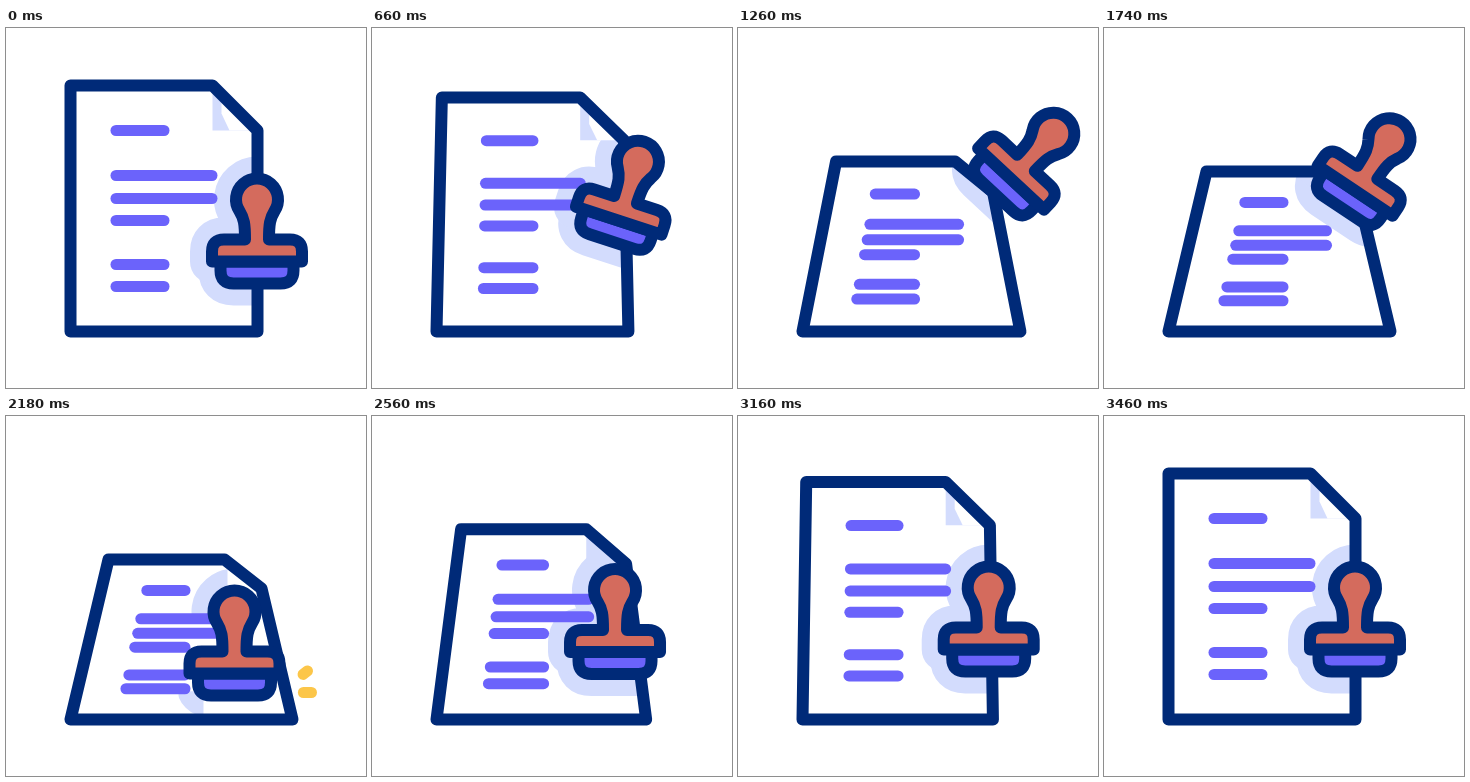
An HTML page with a canvas that plays this animation: 360 by 360 pixels, repeating every 3.48 s.

```html
<!DOCTYPE html>
<html>
<head>
<meta charset="utf-8">
<style>
html, body { margin: 0; width: 100%; height: 100%; overflow: hidden; background: #fff; }
canvas { display: block; }
</style>
</head>
<body>
<canvas id="stage" width="360" height="360"></canvas>
<script>
const ctx = document.getElementById('stage').getContext('2d');
const LOOP = 3480, LIFT = 500, DROP = 1260, HIT = 2060, RETURN = 2190, END = 3460;
const NAVY = '#002a78', RED = '#d46b5d', PURPLE = '#6b63fb', PALE = '#d3dcfd', YELLOW = '#fcc649';

// Stamp parts, with the centre of the handle knob at the origin
const body = new Path2D('M-45 62V52Q-45 40-33 40H-12C-12 24-13 19-17.5 11.6A21 21 0 1 1 17.5 11.6C13 19 12 24 12 40H33Q45 40 45 52V62Z');
const pad = new Path2D('M-36.5 62V71Q-36.5 84-23.5 84H23.5Q36.5 84 36.5 71V62Z');

const mix = (a, b, k) => a + (b - a) * k;
const progress = (t, from, to) => Math.min(1, Math.max(0, (t - from) / (to - from)));

// Ease to rest; push is the starting speed (0 = smoothstep, 3 = cubic ease-out)
function ease(t, from, to, push) {
  const u = progress(t, from, to);
  return u * u * (3 - 2 * u) + push * u * (1 - u) ** 2;
}

const tiltAt = t => ease(t, LIFT, 1500, .63) - ease(t, RETURN, END, 1);

// Lift to the right, slam down to the left, drift back
function stampAt(t) {
  const fall = progress(t, DROP, HIT);
  return {
    x: 250.5 + 64.3 * ease(t, LIFT, 1150, .56) - 86.8 * fall ** 2.1 + 22.5 * ease(t, RETURN, END, 3),
    y: 171 - 65.8 * ease(t, LIFT, 1150, 3) + 89.8 * fall ** 5.5 - 24 * ease(t, RETURN, 2900, 3),
    angle: 43 * (ease(t, LIFT, 1150, 1.9) - fall ** 3)
  };
}

function polygon(...points) {
  const path = new Path2D();
  points.forEach(([x, y]) => path.lineTo(x, y));
  path.closePath();
  return path;
}

function stroke(path, color, width) {
  ctx.strokeStyle = color;
  ctx.lineWidth = width;
  ctx.stroke(path);
}

function fill(path, color) {
  ctx.fillStyle = color;
  ctx.fill(path);
}

function bar(x0, y0, x1, y1, color) {
  const path = new Path2D();
  path.moveTo(x0, y0);
  path.lineTo(x1, y1);
  stroke(path, color, 11);
}

function drawStamp(t, padColor, bodyColor, edge, width) {
  const { x, y, angle } = stampAt(t);
  ctx.save();
  ctx.translate(x, y);
  ctx.rotate(angle * Math.PI / 180);
  for (const [part, color] of [[pad, padColor], [body, bodyColor]]) {
    fill(part, color);
    stroke(part, edge, width);
  }
  ctx.restore();
}

function drawShadow(t) {
  ctx.save();
  if (t > HIT && t < 2300) {
    const visible = new Path2D();
    visible.rect(150, 100, 71, 105);
    visible.rect(172, 275, 25, 23);
    ctx.clip(visible);
  }
  drawStamp(t, PALE, PALE, PALE, 44);
  ctx.restore();
}

function drawPaper(t) {
  const p = tiltAt(t);
  const foldX = mix(206, 218, p), top = mix(57, 143, p);
  const sideX = mix(251, 255, p), foldY = mix(102, 172, p);
  const paper = polygon([mix(64, 102, p), top], [foldX, top], [sideX, foldY], [mix(251, 286, p), 303], [64, 303]);

  ctx.save();
  ctx.clip(paper);
  drawShadow(t);
  if (p < .8) fill(polygon([foldX, top], [sideX, foldY], [foldX, foldY]), PALE);
  if (p < .2) fill(polygon([foldX + 9, top], [foldX + 9, mix(top, foldY, .62)], [foldX + 17, foldY], [sideX, foldY]), '#fff');
  ctx.restore();

  for (const row of [102, 147, 170, 192, 236, 258]) {
    const long = row === 147 || row === 170;
    const y = mix(row, 109.7 + .63 * row, p);
    const left = mix(109.5, 154 - .134 * row, p);
    const right = long ? mix(205.5, 222, p) : mix(157.5, 178.5, p);
    bar(left, y, right, y, PURPLE);
  }
  stroke(paper, NAVY, 12);
}

function drawSparks(t) {
  const s = progress(t, 2080, 2400);
  if (s === 0 || s > .77) return;
  const head = 1 - (1 - Math.min(1, s * 1.4)) ** 2, tail = Math.min(head, s * 1.3);
  const spark = (x, y, dx, dy) => bar(x + dx * tail, y + dy * tail, x + dx * head, y + dy * head, YELLOW);
  spark(290, 263, 16, -12.5);
  spark(285, 276, 29, 0);
}

const start = performance.now();

function frame() {
  const t = (performance.now() - start) % LOOP;
  ctx.setTransform(1, 0, 0, 1, .5, .5);
  ctx.clearRect(-1, -1, 362, 362);
  ctx.lineJoin = ctx.lineCap = 'round';
  drawPaper(t);
  drawSparks(t);
  drawStamp(t, PURPLE, RED, NAVY, 12);
  requestAnimationFrame(frame);
}
frame();
</script>
</body>
</html>
```
